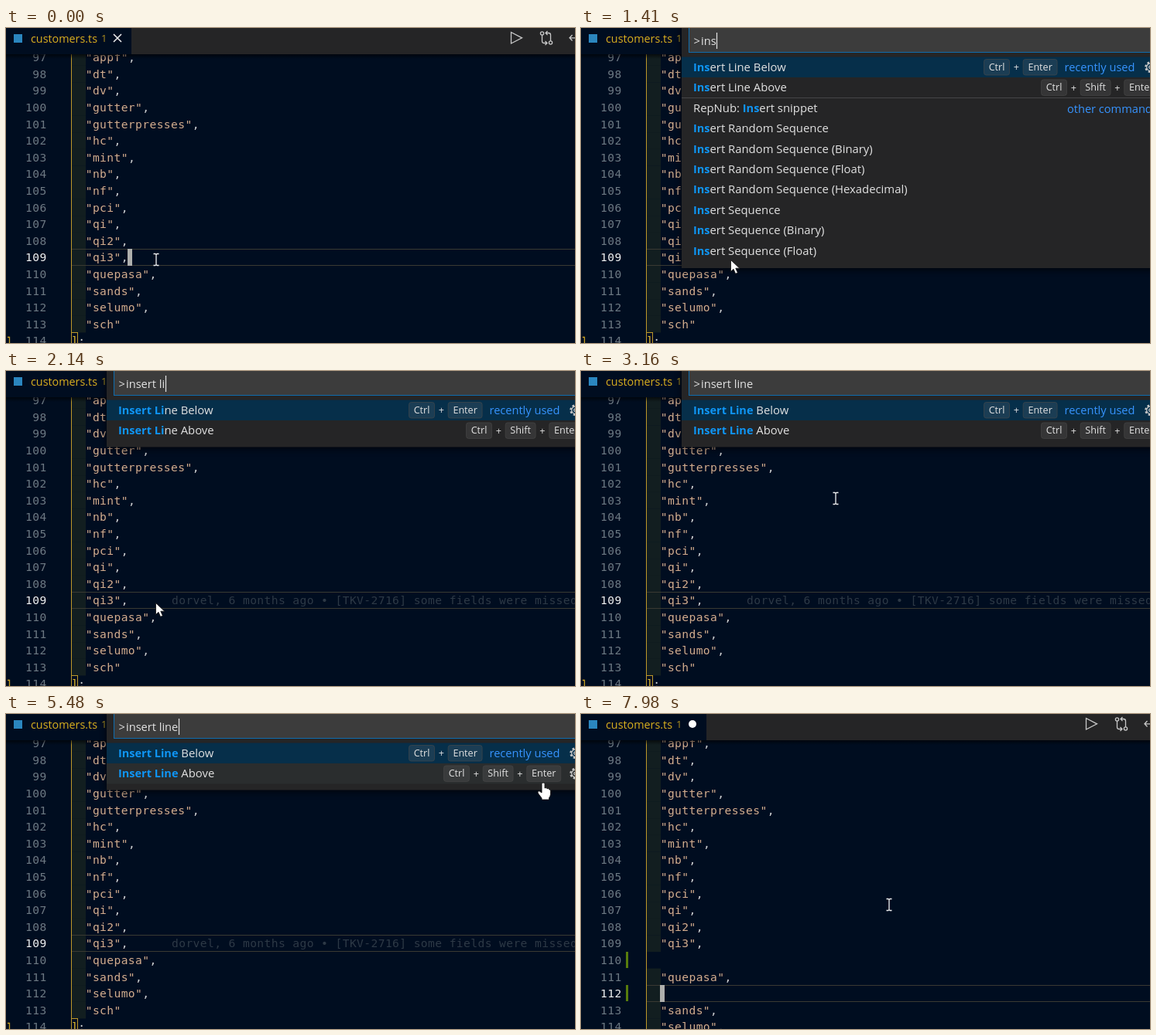
Recreate the animation shown at these times as an HTML page. Size 735 px wide and 408 px high, loop 8000 ms.

```html
<!DOCTYPE html>
<html lang="en">
<head>
<meta charset="utf-8">
<title>Insert line</title>
<style>
  html, body { margin: 0; width: 100%; height: 100%; overflow: hidden; background: #000d20; }
  svg { display: block; width: 735px; height: 408px; }
  text { white-space: pre; font: 14.85px "Open Sans", "Noto Sans", sans-serif; fill: #e2e2e2; }
  .code { font: 14.6px "DejaVu Sans Mono", "Noto Sans Mono", monospace; letter-spacing: .41px; fill: #d4ad8e; }
  .num { fill: #6c7882; text-anchor: end; }
  .on { fill: #f0f0f0; }
  .punct { fill: #d0d2d4; }
  .blame { fill: #2d3946; }
  .hit { fill: #0f95f5; font-weight: 700; font-size: 14.5px; }
  .label { fill: #3794ff; font-size: 14.6px; }
  .key { font-size: 12.6px; text-anchor: middle; }
  .tab { font-size: 14.35px; fill: #dcb01f; }
  .typed { font-size: 14.6px; }
  .icon { fill: none; stroke: #c8c8c8; stroke-width: 1.3; }
</style>
</head>
<body>
<svg id="stage" viewBox="0 0 735 408">
  <defs>
    <clipPath id="pane"><rect y="34" width="735" height="374"/></clipPath>
    <linearGradient id="fade" x2="0" y2="1">
      <stop stop-color="#000" stop-opacity=".6"/><stop offset="1" stop-color="#000" stop-opacity="0"/>
    </linearGradient>
    <filter id="shade" x="-10%" y="-20%" width="120%" height="140%"><feGaussianBlur stdDeviation="5"/></filter>
  </defs>
  <g id="view"></g>
</svg>
<script>
const LOOP = 8000, OPEN = 850, SHRINK = 2340, CLOSE = 5940, DOWN = 7050, SECOND = 7800;
const ROW = 21.6, ITEM = 26.4;
const view = document.getElementById('view');

const words = ['appf', 'dt', 'dv', 'gutter', 'gutterpresses', 'hc', 'mint', 'nb', 'nf',
  'pci', 'qi', 'qi2', 'qi3', 'quepasa', 'sands', 'selumo', 'sch'];
const blame = 'dorvel, 6 months ago • [TKV-2716] some fields were missed';

// label, left edge of the shortcut, shortcut
const recent = [
  ['Insert Line Below', 520, 'Ctrl+Enter'],
  ['Insert Line Above', 594, 'Ctrl+Shift+Enter'],
  ['Reload Custom CSS and JS'],
  ['Format Document', 622, 'Shift+Alt+F'],
  ['Unfold All', 589, 'Ctrl+K Ctrl+0'],
  ['Fold All', 589, 'Ctrl+K Ctrl+0'],
  ['Collapse Folders in Explorer', 556, 'Ctrl+Shift+Alt+End'],
  ['View: Toggle Terminal', 677, 'Ctrl+`'],
  ['View: Toggle Side Bar Visibility', 673, 'Ctrl+B'],
  ['Change Case constant']
];
const extra = ['Join Lines', 'Toggle Line Comment', 'Toggle Minimap', 'Sort Lines Ascending',
  'Trim Final Newlines', 'Duplicate Line'].map(s => [s]);
const inserts = ['RepNub: Insert snippet', 'Insert Random Sequence', 'Insert Random Sequence (Binary)',
  'Insert Random Sequence (Float)', 'Insert Random Sequence (Hexadecimal)', 'Insert Sequence',
  'Insert Sequence (Binary)', 'Insert Sequence (Float)'].map(s => [s]);
const keyWidth = { Ctrl: 34, Shift: 40, Enter: 45, Alt: 29, End: 36 };

const phrase = 'insert line';
const strokes = [1130, 1210, 1410, 1590, 1670, 1850, 1950, 2050, 2130, 2230, SHRINK];

// time, x, y, number of hops since the previous point
const path = [[2710, 194, 300, 1], [3160, 329, 165, 5], [3540, 500, 61, 4], [4000, 596, 51, 5],
  [4190, 596, 51, 1], [5000, 682, 84, 9], [5100, 694, 89, 1], [5470, 694, 89, 1], [5850, 590, 52, 4],
  [5940, 590, 52, 1], [6120, 567, 46, 2], [6220, 517, 107, 1], [6480, 398, 247, 3]];

const rect = (x, y, w, h, fill, more = '') =>
  `<rect x="${x}" y="${y}" width="${w}" height="${h}" fill="${fill}" ${more}/>`;
const text = (x, y, s, cls = '') => `<text x="${x}" y="${y}" class="${cls}">${s}</text>`;
const line = (d, stroke, w = 1) => `<path d="${d}" fill="none" stroke="${stroke}" stroke-width="${w}"/>`;

const ruler = document.createElement('canvas').getContext('2d');
function typedWidth(s) {
  ruler.font = '14.6px "Open Sans", "Noto Sans", sans-serif';
  return ruler.measureText(s).width;
}

function pointer(t) {
  const i = path.findIndex(p => p[0] > t);
  if (i === 0) return path[0].slice(1, 3);
  if (i < 0) return path[path.length - 1].slice(1, 3);
  const [t0, x0, y0] = path[i - 1], [t1, x1, y1, hops] = path[i];
  const k = Math.floor((t - t0) / (t1 - t0) * hops + 1e-6) / hops;
  return [x0 + (x1 - x0) * k, y0 + (y1 - y0) * k];
}

function editor(t) {
  const lines = words.slice();
  if (t >= CLOSE) lines.splice(13, 0, '');
  if (t >= SECOND) lines.splice(15, 0, '');
  const active = t < CLOSE ? 12 : t < DOWN ? 13 : t < SECOND ? 14 : 15;
  const top = i => 27.2 + i * ROW;
  let out = '';
  lines.forEach((word, i) => {
    if (!(t >= SECOND && i === 13)) out += rect(85, top(i), 18, ROW + .1, '#121e20');
  });
  const y = Math.round(top(active));
  out += line(`M85 ${y}.5H735M85 ${y + 21}.5H735`, '#3a3932');
  out += line(`M84.5 34V${t < CLOSE ? 394 : 408}`, '#bd982a');
  lines.forEach((word, i) => {
    const base = top(i) + 16;
    out += text(52.7, base, 97 + i, 'code num' + (i === active ? ' on' : ''));
    if (!word) return;
    const comma = word === 'sch' ? '' : '<tspan class="punct">,</tspan>';
    out += text(102.7, base, `"${word}"${comma}`, 'code');
  });
  if (t < CLOSE) {
    out += text(52.7, top(17) + 16, 114, 'code num');
    out += text(84, top(17) + 16, '<tspan fill="#e0b92c">]</tspan><tspan class="punct">;</tspan>', 'code');
    out += rect(84.5, 394.5, 8, 16, 'none', 'stroke="#bd982a"');
    out += line('M2 400.5H4.5V408', '#c79f22', 1.3);
    if (t >= 100) out += text(214, top(12) + 16, blame, 'code blame');
  }
  if (t >= 6390) out += rect(58, 308, 3, 21, '#587c0c');
  if (t >= 7970) out += rect(58, 351, 3, 21, '#587c0c');
  if (t < OPEN || t >= CLOSE) out += rect(t < CLOSE ? 157 : 102, y, 6, 22, '#aeafad');
  return `<g clip-path="url(#pane)">${out}</g>`;
}

function header(t) {
  let out = rect(0, 0, 735, 34, '#252526') + rect(0, 0, 162, 34, '#000d20');
  out += rect(0, 34, 735, 6, 'url(#fade)');
  out += rect(10, 8, 11, 11, '#2b86bf');
  out += text(32, 18.5, 'customers.ts', 'tab');
  out += '<text x="123" y="18" class="tab" style="font-size:13px" opacity=".8">1</text>';
  out += t < CLOSE ? line('M139 8L149 18M149 8L139 18', '#f0f0f0', 1.5)
    : '<circle cx="144" cy="13" r="5" fill="#fff"/>';
  out += '<path class="icon" d="M652.5 5.5V20L666.5 12.8Z"/>';
  out += '<path class="icon" d="M692.5 9V17Q692.5 19.5 695 19.5H699M696.5 17L699 19.5 696.5 22M703.5 17V9Q703.5 6.5 701 6.5H697M699.5 4L697 6.5 699.5 9"/>';
  out += '<circle class="icon" cx="692.5" cy="7" r="2.1"/><circle class="icon" cx="703.5" cy="19" r="2.1"/>';
  out += '<path class="icon" d="M735 12.8H728M731.5 9L728 12.8 731.5 16.5"/>';
  return out;
}

function keys(x, cy, combo) {
  let out = '';
  combo.split(' ').forEach(chord => {
    chord.split('+').forEach((name, i) => {
      if (i) {
        out += text(x + 8.3, cy + 4.5, '+', 'key');
        x += 16.6;
      }
      const w = keyWidth[name] || 21;
      out += rect(x + .5, cy - 10.2, w - 1, 20.5, '#808080', 'fill-opacity=".17" rx="3" stroke="#4a4a4a" stroke-opacity=".6"');
      out += text(x + w / 2, cy + 4.3, name, 'key');
      x += w;
    });
    x += 12;
  });
  return out;
}

const gear = cy => `<g class="icon"><circle cx="735.5" cy="${cy}" r="6.2" stroke-width="2.2" stroke-dasharray="2.6 2.27"/>
  <circle cx="735.5" cy="${cy}" r="4.8"/><circle cx="735.5" cy="${cy}" r="1.8"/></g>`;

function mark(label, query) {
  const q = query.trim(), at = q ? label.toLowerCase().indexOf(q) : -1;
  if (at < 0) return label;
  const end = at + q.length;
  return `${label.slice(0, at)}<tspan class="hit">${label.slice(at, end)}</tspan>${label.slice(end)}`;
}

function results(query) {
  if (!query) return recent;
  if (query.length > 7) return recent.slice(0, 2);
  if (query.length > 2) return recent.slice(0, 2).concat(inserts);
  return recent.concat(extra).filter(r => r[0].toLowerCase().includes(query)).slice(0, 10);
}

function palette(t, [px, py]) {
  const query = phrase.slice(0, strokes.filter(s => s <= t).length);
  const items = results(query);
  const height = items.length > 2 ? 311 : 98.5;
  const hover = t >= SHRINK && px > 130 ? Math.floor((py - 37.5) / ITEM) : -1;
  let out = rect(130, -10, 640, height + 12, '#000', 'filter="url(#shade)" opacity=".7"');
  out += rect(130, 0, 605, height, '#252526');
  out += rect(139.5, -2, 600, 33.5, '#3c3c3c', 'stroke="#0f6cae"');
  out += text(145.5, 22, '&gt;', 'typed') + text(155, 22, query, 'typed');
  const lit = t < 2980 || Math.floor((t - 2980) / 500) % 2;
  if (lit) {
    const x = Math.round(155.5 + typedWidth(query)) + .5;
    out += line(`M${x} 6V27`, '#e4e4e4', 1.2);
  }
  items.forEach(([label, x, combo], i) => {
    const cy = 50.7 + i * ITEM, hot = i === hover && i === 1;
    if (i === 0) out += rect(130, 37.5, 605, ITEM, '#062f4a');
    if (hot) out += rect(130, 64, 605, ITEM, '#2a2d2e');
    out += text(145, cy + 5.2, mark(label, query));
    if (combo) out += keys(hot ? x - 29 : x, cy, combo);
    if (i === 0) out += text(624.5, cy + 5.2, 'recently used', 'label');
    if (i === 0 || hot) out += gear(cy);
  });
  if (items.length > 2 && query.length > 2) {
    out += line('M130 90.5H735', '#454548') + text(628, 109.5, 'other commands', 'label');
  }
  return out;
}

function mouse(t, [x, y]) {
  const open = t >= OPEN && t < CLOSE;
  const inside = open && x > 130 && y < 98;
  let shape;
  if (open && t < SHRINK || inside && (y < 37 || y > 91)) {
    shape = '<path d="M-.5 .5V15.5L3 12.3 5.6 18.3 8.4 17 5.8 11.2H10.8Z" fill="#fff" stroke="#111" stroke-width=".8"/>';
  } else if (inside) {
    shape = '<path d="M-2 1.5Q0-2 2 1.5V7Q4 5.6 5 7.8 7 6.4 8 9 10 8.6 9.5 12V15Q9 18 7.5 19.5V22H-2V20L-6.5 14Q-8 11-5 10.8L-2 13Z" fill="#fff" stroke="#111" stroke-width=".9"/>';
  } else {
    shape = line('M-3.5-7.5H-1.2L0-6.5 1.2-7.5H3.5M0-6.5V6.5M-3.5 7.5H-1.2L0 6.5 1.2 7.5H3.5', '#f2f2f2', 1.3);
  }
  return `<g transform="translate(${x} ${y})">${shape}</g>`;
}

let last = '';
function draw(t) {
  const at = pointer(t);
  const open = t >= OPEN && t < CLOSE;
  const scene = editor(t) + header(t) + (open ? palette(t, at) : '') + mouse(t, at);
  if (scene !== last) view.innerHTML = last = scene;
}

const start = performance.now();
function tick() {
  draw((performance.now() - start) % LOOP);
  requestAnimationFrame(tick);
}
tick();
</script>
</body>
</html>
```
